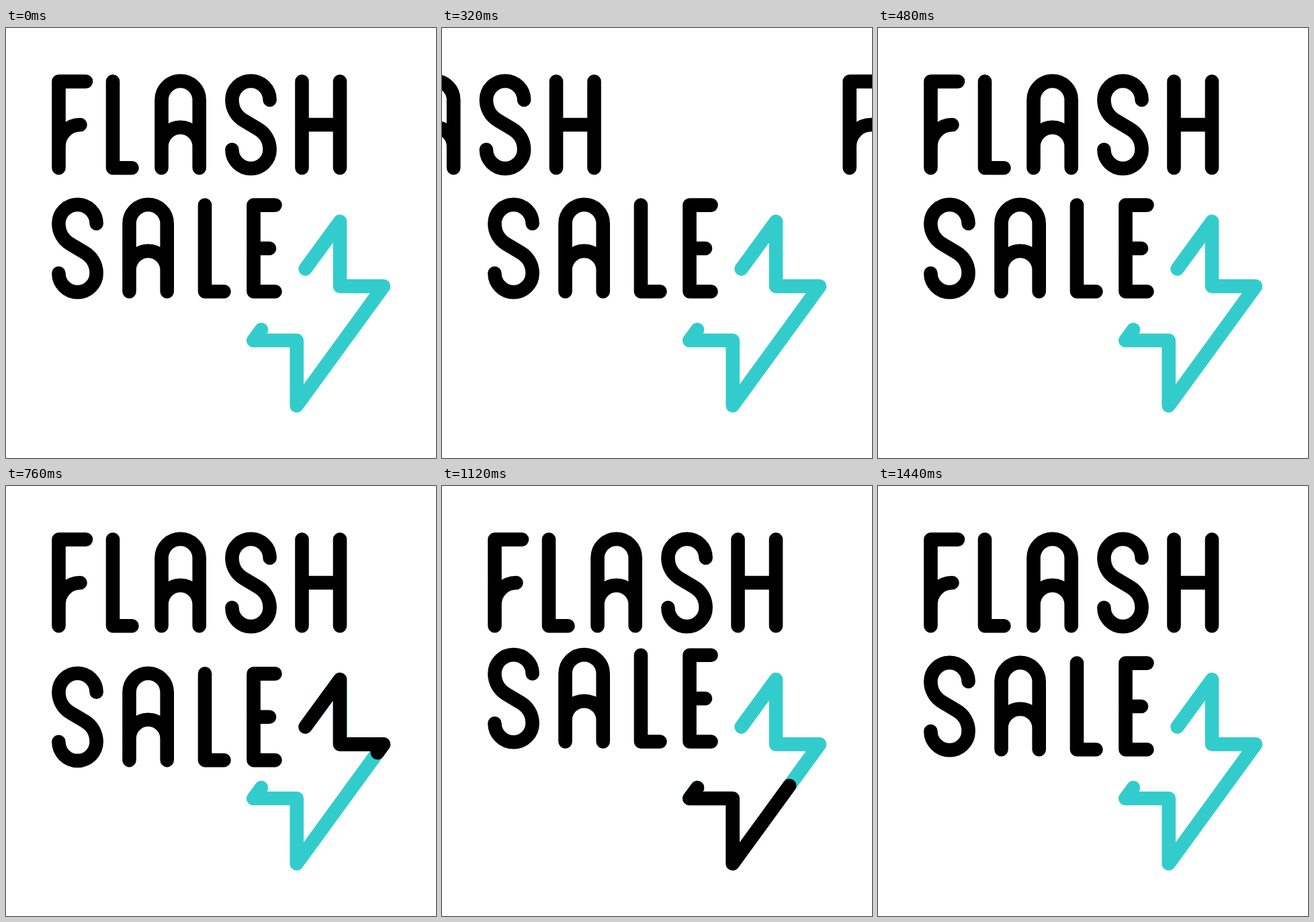
Write an HTML page with a canvas that moves like this. It is 640 px wide and 640 px high and loops after 1480 ms.

```html
<!DOCTYPE html>
<html lang="en">
<head>
<meta charset="utf-8">
<title>Flash sale</title>
<style>
  html, body { margin: 0; width: 100%; height: 100%; overflow: hidden; background: #fff; }
  canvas { display: block; width: 100vw; height: 100vh; }
</style>
</head>
<body>
<canvas id="stage" width="640" height="640"></canvas>
<script>
const ctx = document.getElementById('stage').getContext('2d');
const LOOP = 1480, STEP = 40, LINE = 20.6;
const INK = '#000', TEAL = '#33cccc';

// Letter strokes, placed as in the top row.
const GLYPHS = {
  F: 'M119 79.6H78.5V208.3M110.5 144A32 32 0 0 0 78.5 176',
  L: 'M159 79.6V208.3H187.5',
  A: 'M231.5 208.3V107A28.1 28.1 0 0 1 287.7 107V208.3M231.5 176A28.1 28.1 0 0 1 287.7 176',
  S: 'M392.6 107A28.1 28.1 0 0 0 336.4 107A35.6 35.6 0 0 0 353.8 137.6' +
     'L375.2 150.4A35.6 35.6 0 0 1 392.6 181A28.1 28.1 0 0 1 336.4 181',
  H: 'M440.5 79.6V208.3M497 79.6V208.3M440.5 144H497',
  E: 'M400.5 79.6H368.5V208.3H400.5M368.5 144H392'
};

function word(letters, dy) {
  const path = new Path2D();
  for (const [name, dx] of letters) {
    path.addPath(new Path2D(GLYPHS[name]), new DOMMatrix([1, 0, 0, 1, dx, dy]));
  }
  return path;
}

const flash = word([['F', 0], ['L', 0], ['A', 0], ['S', 0], ['H', 0]], 0);
const sale = word([['S', -258], ['A', -48], ['L', 137], ['E', 0]], 184);

const corners = [[445.5, 358.5], [497, 288], [497, 384.4], [562, 384.4],
                 [432.7, 562], [432.7, 465], [368.2, 465], [380, 449]];
const bolt = new Path2D('M' + corners.join('L'));
const boltLength = corners.slice(1).reduce(
  (sum, [x, y], i) => sum + Math.hypot(x - corners[i][0], y - corners[i][1]), 0);

function ease(t, from, to) {
  const u = Math.min(1, Math.max(0, (t - from) / (to - from)));
  return u * u * (3 - 2 * u);
}

function stroke(path, color, dx = 0, dy = 0) {
  ctx.save();
  ctx.translate(dx, dy);
  ctx.strokeStyle = color;
  ctx.stroke(path);
  ctx.restore();
}

function drawBolt(t) {
  stroke(bolt, TEAL);
  const start = ease(t, 800, 1440) * boltLength;
  const end = ease(t, 480, 1120) * boltLength;
  if (end - start < 0.01) return;
  ctx.save();
  if (end - start < boltLength) {
    ctx.setLineDash([end - start, boltLength * 2]);
    ctx.lineDashOffset = -start;
  }
  stroke(bolt, INK);
  ctx.restore();
}

function draw(t) {
  ctx.fillStyle = '#fff';
  ctx.fillRect(0, 0, 640, 640);
  ctx.lineWidth = LINE;
  ctx.lineCap = ctx.lineJoin = 'round';

  // One copy leaves on the right while another arrives from the left.
  if (t < 400) stroke(flash, INK, 626 * ease(t, 80, 400));
  if (t > 160) stroke(flash, INK, -541 * (1 - ease(t, 160, 480)));

  const bob = 16.5 * ease(t, 480, 800) - 29.3 * ease(t, 800, 1160) + 12.8 * ease(t, 1160, 1440);
  stroke(sale, INK, 0, bob);
  drawBolt(t);
}

const origin = performance.now();
function tick() {
  const t = (performance.now() - origin) % LOOP;
  draw(Math.floor(t / STEP) * STEP);
  requestAnimationFrame(tick);
}
tick();
</script>
</body>
</html>
```
